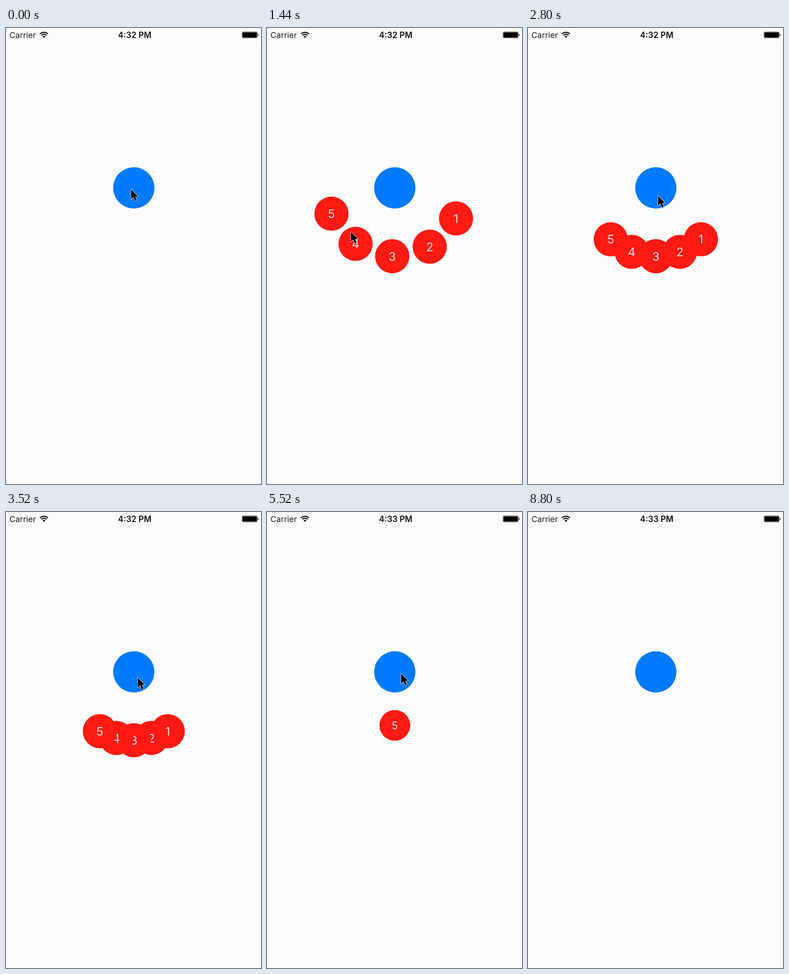
These frames come from a looping animation (559x1001 px, 8.96 s). An HTML page:

```html
<!DOCTYPE html>
<html lang="en">
<head>
<meta charset="utf-8">
<title>Radial menu</title>
<style>
  html, body { margin: 0; width: 100%; height: 100%; overflow: hidden; background: #fdfdfd; }
  svg { display: block; width: 100vw; height: 100vh; }
  text { font-family: Inter, Roboto, sans-serif; }
  #cursor { filter: drop-shadow(0 1.5px 1.2px rgba(0, 0, 0, .4)); }
</style>
</head>
<body>
<svg viewBox="0 0 559 1001" xmlns="http://www.w3.org/2000/svg">
  <rect width="559" height="1001" fill="#fdfdfd"/>

  <text x="7.5" y="22" font-size="17.8" fill="#1c1c1c">Carrier</text>
  <g transform="translate(83.2 21.8)" fill="none" stroke="#111" stroke-width="2.4">
    <path d="M-8.7 -8.7A12.3 12.3 0 0 1 8.7 -8.7"/>
    <path d="M-5.7 -5.7A8 8 0 0 1 5.7 -5.7"/>
    <path d="M0 0L-3.2 -3.2A4.5 4.5 0 0 1 3.2 -3.2Z" fill="#111" stroke="none"/>
  </g>
  <text id="clock" x="282.2" y="22" font-size="18" font-weight="600" text-anchor="middle" fill="#111"></text>
  <rect x="517.4" y="8.4" width="33.4" height="13.6" rx="2.4" fill="none" stroke="#555" stroke-width="1"/>
  <rect x="518.4" y="9.4" width="31.4" height="11.6" rx="1.4" fill="#000"/>
  <path d="M551.8 12.6Q553.8 13.2 553.8 15.2T551.8 17.8Z" fill="#222"/>

  <circle cx="280.2" cy="351" r="45.2" fill="#007aff"/>
  <g id="menu"></g>
  <path id="cursor" d="M0 0V21.6L5 17L8.7 25.6L12.6 23.9L9 15.5H15.4Z"
    fill="#000" stroke="#fff" stroke-width="1.7" stroke-linejoin="round" paint-order="stroke"/>
</svg>
<script>
const LOOP = 8960, STEP = 80;
const CX = 280.2, CY = 351, ORBIT = 150, RADIUS = 37.5, SPACING = 35;
const OPEN = 290, CLOSE = 331;

// Each cycle: opening time, closing time, angle where the items gather
const cycles = [
  [275, 1382, -SPACING],
  [2350, 3340, 0],
  [4250, 5082, 0]
];

// Pointer stops: time, x, y
const stops = [
  [0, 274.4, 354.5], [560, 274.4, 354.5],
  [1280, 184, 447.5], [1520, 184, 447.5],
  [2160, 285, 368.5], [2800, 285, 368.5],
  [4400, 294, 357.3], [5520, 294, 355], [5640, 294, 355],
  [6200, 199, 164], [6640, 500, 754.5], [6800, 508, 779]
];
const POINTER_OFF = 6880, MINUTE = 3800;

const $ = id => document.getElementById(id);
const clamp = v => Math.max(0, Math.min(1, v));
const mix = (a, b, p) => a + (b - a) * p;

// cubic-bezier(.42, 0, .58, 1)
function ease(x) {
  x = clamp(x);
  let lo = 0, hi = 1;
  for (let i = 0; i < 24; i++) {
    const u = (lo + hi) / 2, v = 1 - u;
    if (1.26 * u * v * v + 1.74 * u * u * v + u * u * u < x) lo = u; else hi = u;
  }
  return lo * lo * (3 - 2 * lo);
}

function make(tag, attrs, parent) {
  const el = document.createElementNS("http://www.w3.org/2000/svg", tag);
  for (const k in attrs) el.setAttribute(k, attrs[k]);
  return parent.appendChild(el);
}

const items = [1, 2, 3, 4, 5].map(n => {
  const g = make("g", {}, $("menu"));
  make("circle", { r: RADIUS, fill: "#ff1a14" }, g);
  make("text", {
    y: 9.6, "font-size": 26, "text-anchor": "middle", fill: "#fff", "fill-opacity": .86
  }, g).textContent = n;
  return { g, angle: (3 - n) * SPACING };
});

// reach: distance from the button, fan: spread of the items, both 0 to 1
function menuState(t) {
  for (const [open, close, pivot] of cycles) {
    if (t <= open || t >= close + 2 * CLOSE) continue;
    if (t < close) {
      return { reach: ease((t - open) / OPEN), fan: ease((t - open) / OPEN - 1), pivot: 0 };
    }
    const x = (t - close) / CLOSE;
    return { reach: 1 - ease(x - 1), fan: 1 - ease(x), pivot };
  }
  return null;
}

function drawMenu(t) {
  const s = menuState(t);
  $("menu").style.display = s ? "" : "none";
  if (!s) return;
  for (const { g, angle } of items) {
    const a = mix(s.pivot, angle, s.fan) * Math.PI / 180;
    const x = CX + ORBIT * s.reach * Math.sin(a);
    const y = CY + ORBIT * s.reach * Math.cos(a);
    g.setAttribute("transform", `translate(${x} ${y}) scale(${.5 + .5 * s.reach})`);
  }
}

function drawCursor(t) {
  $("cursor").style.display = t < POINTER_OFF ? "" : "none";
  let i = 0;
  while (i < stops.length - 2 && t >= stops[i + 1][0]) i++;
  const [t0, x0, y0] = stops[i], [t1, x1, y1] = stops[i + 1];
  const p = ease((t - t0) / (t1 - t0));
  $("cursor").setAttribute("transform", `translate(${mix(x0, x1, p)} ${mix(y0, y1, p)})`);
}

function draw(now) {
  const t = Math.floor(now % LOOP / STEP) * STEP;
  $("clock").textContent = t < MINUTE ? "4:32 PM" : "4:33 PM";
  drawMenu(t);
  drawCursor(t);
}

const start = performance.now();
function tick() {
  draw(performance.now() - start);
  requestAnimationFrame(tick);
}
tick();
</script>
</body>
</html>
```
